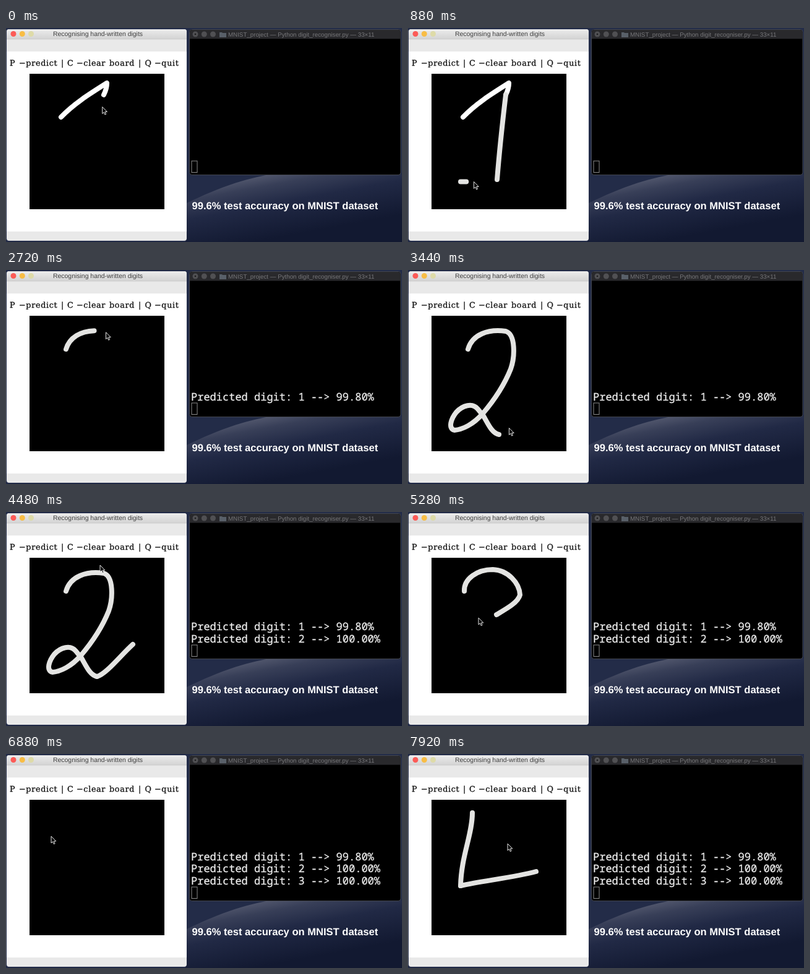
An HTML page for the animation above (8000 ms loop, 640 by 346 pixels).

```html
<!DOCTYPE html>
<html lang="en">
<head>
<meta charset="utf-8">
<title>Recognising hand-written digits</title>
<style>
  html, body { margin: 0; width: 100%; height: 100%; overflow: hidden; background: #161d33; }
  svg { display: block; width: 100%; height: 100%; }
  text { white-space: pre; text-rendering: geometricPrecision; }
  .title { font-family: "Liberation Sans", sans-serif; }
  .keys { font: 12.7px "DejaVu Serif", serif; letter-spacing: .7px; fill: #111; stroke: #111; stroke-width: .3; }
  .mono { font: 17px "Noto Sans Mono", monospace; fill: #ececec; stroke: #ececec; stroke-width: .3; }
  .caption { font: bold 16.56px "Liberation Sans", sans-serif; fill: #fff; }
  .ink { fill: none; stroke-width: 8; stroke-linecap: round; stroke-linejoin: round; }
</style>
</head>
<body>
<svg viewBox="0 0 640 346">
  <defs>
    <linearGradient id="sand" gradientUnits="userSpaceOnUse" x1="380" y1="238" x2="400" y2="346">
      <stop offset="0" stop-color="#5a5f74"/>
      <stop offset=".22" stop-color="#383f58"/>
      <stop offset=".5" stop-color="#212945"/>
      <stop offset="1" stop-color="#121931"/>
    </linearGradient>
    <linearGradient id="bar" x2="0" y2="1">
      <stop offset="0" stop-color="#ececec"/>
      <stop offset="1" stop-color="#d3d3d3"/>
    </linearGradient>
  </defs>

  <!-- Desktop -->
  <rect width="640" height="346" fill="#232c48"/>
  <path d="M290 284C320 270 365 248 425 237H640V346H290Z" fill="url(#sand)"/>

  <!-- Drawing window -->
  <rect x="1" y="2" width="291" height="342" rx="4" fill="#e9e9e9"/>
  <path d="M1 18V6a4 4 0 0 1 4-4H288a4 4 0 0 1 4 4V18Z" fill="url(#bar)"/>
  <path d="M1 18H292" stroke="#c4c4c4" stroke-width=".7"/>
  <rect x="1" y="38" width="291" height="291" fill="#fff"/>
  <circle cx="12" cy="9.5" r="4.5" fill="#fc5b57"/>
  <circle cx="26.3" cy="9.5" r="4.5" fill="#f8bd45"/>
  <circle cx="40.5" cy="9.5" r="4.5" fill="#dedba8"/>
  <text class="title" x="76" y="13.300" font-size="10.45" fill="#404040">Recognising hand-written digits</text>
  <text class="keys" y="61"><tspan x="6">P</tspan><tspan x="21">−predict</tspan><tspan x="89">|</tspan><tspan x="99">C</tspan><tspan x="114">−clear</tspan><tspan x="167">board</tspan><tspan x="214">|</tspan><tspan x="224.500">Q</tspan><tspan x="240">−quit</tspan></text>
  <rect x="38" y="74" width="218" height="219"/>
  <g id="board"></g>

  <!-- Terminal window -->
  <rect x="296.500" y="2.500" width="341.500" height="235" rx="4" stroke="#43464f"/>
  <path d="M297 17.500V7a4 4 0 0 1 4-4H633.500a4 4 0 0 1 4 4V17.500Z" fill="#29292c"/>
  <g fill="#505053">
    <circle cx="306" cy="10" r="4.500"/>
    <circle cx="320.300" cy="10" r="4.500"/>
    <circle cx="334.500" cy="10" r="4.500"/>
    <path d="M345 7h4l1 1h6v7h-11Z" fill="#596069"/>
  </g>
  <circle cx="306" cy="10" r="1.300" fill="#1c1c1e"/>
  <text class="title" x="359" y="13.500" font-size="9.75" fill="#77777a">MNIST_project — Python digit_recogniser.py — 33×11</text>
  <g id="output"></g>
  <rect x="300" y="215" width="9" height="18.500" fill="none" stroke="#8b8b8b"/>

  <text class="caption" x="300.500" y="293">99.6% test accuracy on MNIST dataset</text>

  <path id="cursor" d="M0 0V11L2.500 8.700L4.200 12.600L6 11.800L4.300 8H7.800Z" fill="#050505" stroke="#fff" stroke-width=".9"/>
</svg>

<script>
const LOOP = 8000, STEP = 80;
const CURSOR_LEAD = 40;   // the pointer runs slightly ahead of the ink
const WHITE = '#fff', GREY = '#e4e4e2';

// Pen strokes: when they are drawn, when the board is cleared, and their path.
const strokes = [
  { start: -200, end: 0, clear: 2240, color: WHITE, d: 'M89 144C110 122 136 106 163 89Q163 98 158 108' },
  { start: 0, end: 280, clear: 2240, color: GREY, d: 'M158 108C153 150 148 195 144 245' },
  { start: 850, end: 1200, clear: 2240, color: GREY, d: 'M85 248.500H192' },
  { start: 2600, end: 3440, clear: 4640, color: GREY,
    d: 'M97 128C104 104 130 95 158 99C174 104 173 140 166 160C154 190 138 212 121 232' +
       'C105 250 88 258 75 259C64 256 70 240 78 230C88 219 104 214 113 225L122 236C130 250 136 264 147 266' },
  { start: 3440, end: 3600, clear: 4640, color: GREY, d: 'M147 266C162 262 185 232 205 214' },
  { start: 4860, end: 5280, clear: 6800, color: GREY,
    d: 'M91 128C90 108 112 93 137 93C162 94 180 115 181 134C178 146 160 156 143 166' },
  { start: 5280, end: 5640, clear: 6800, color: GREY,
    d: 'M143 166Q128 172 110 171C150 170 187 190 186 225C184 255 140 271 112 268C98 265 88 258 85 248' },
  { start: 7540, end: 7700, clear: LOOP, color: GREY, d: 'M104 95C104 130 86 165 85 213' },
  { start: 7700, end: 7900, clear: LOOP, color: GREY, d: 'M85 213C120 205 170 200 207 190' },
];

const predictions = [
  { time: 1440, text: 'Predicted digit: 1 --> 99.80%' },
  { time: 4160, text: 'Predicted digit: 2 --> 100.00%' },
  { time: 6160, text: 'Predicted digit: 3 --> 100.00%' },
];

// Pointer positions between strokes: time, x, y.
const hovers = [
  [1560, 170, 205], [2040, 133, 136], [4000, 205, 214], [4520, 152, 86],
  [6160, 90, 238], [6920, 73, 133], [7960, 161, 145], [LOOP + CURSOR_LEAD, 155, 128],
];

const byId = id => document.getElementById(id);

function addSvg(parent, tag, attributes) {
  const node = document.createElementNS('http://www.w3.org/2000/svg', tag);
  for (const name in attributes) node.setAttribute(name, attributes[name]);
  return parent.appendChild(node);
}

for (const s of strokes) {
  s.node = addSvg(byId('board'), 'path', { class: 'ink', d: s.d, stroke: s.color });
  s.length = s.node.getTotalLength();
}
for (const p of predictions) {
  p.node = addSvg(byId('output'), 'text', { class: 'mono', x: 299 });
  p.node.textContent = p.text;
}

const strokePoint = (s, part) => {
  const { x, y } = s.node.getPointAtLength(s.length * part);
  return [x, y];
};

const waypoints = [
  ...hovers,
  ...strokes.flatMap(s => [[s.start, ...strokePoint(s, 0)], [s.end, ...strokePoint(s, 1)]]),
].sort((a, b) => a[0] - b[0]);

function penAt(time) {
  const active = strokes.find(s => time >= s.start && time < s.end);
  if (active) return strokePoint(active, (time - active.start) / (active.end - active.start));
  const next = waypoints.findIndex(w => w[0] > time);
  if (next < 0) return waypoints.at(-1).slice(1);
  const [t0, x0, y0] = waypoints[next - 1], [t1, x1, y1] = waypoints[next];
  const part = (time - t0) / (t1 - t0), eased = part * part * (3 - 2 * part);
  return [x0 + (x1 - x0) * eased, y0 + (y1 - y0) * eased];
}

function render(time) {
  for (const s of strokes) {
    const part = Math.min(1, (time - s.start) / (s.end - s.start));
    s.node.style.display = part > 0 && time < s.clear ? '' : 'none';
    s.node.style.strokeDasharray = part < 1 ? `${s.length * Math.max(0, part)} 2000` : 'none';
  }
  const shown = predictions.filter(p => time >= p.time).length;
  predictions.forEach((p, i) => {
    p.node.style.display = i < shown ? '' : 'none';
    p.node.setAttribute('y', 211 - 19.6 * (shown - 1 - i));
  });
  byId('cursor').setAttribute('transform', `translate(${penAt(time + CURSOR_LEAD)})`);
}

const origin = performance.now();
function tick() {
  const time = (performance.now() - origin) % LOOP;
  render(Math.floor(time / STEP) * STEP);
  requestAnimationFrame(tick);
}
tick();
</script>
</body>
</html>
```
